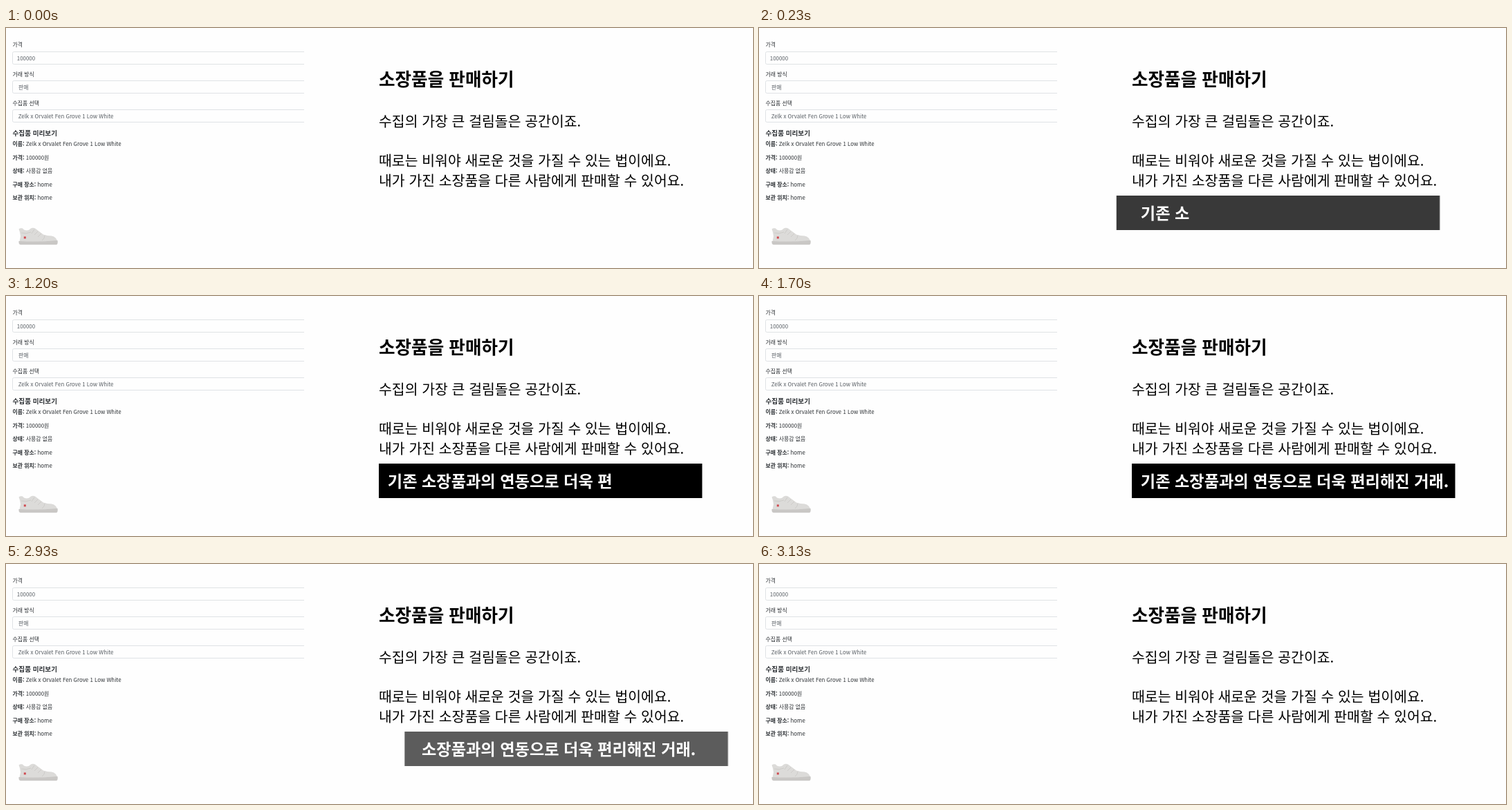
An HTML page for the animation above (5.01 s loop, 1080 by 348 pixels).

```html
<!DOCTYPE html>
<html lang="ko">
<head>
<meta charset="utf-8">
<title>소장품을 판매하기</title>
<style>
  html, body { margin: 0; width: 100%; height: 100%; overflow: hidden; background: #fefefe; }
  svg { display: block; font-family: "Noto Sans CJK KR", "Noto Sans", sans-serif; }

  .form { font-size: 7.9px; fill: #2b2f33; }
  .form .value { fill: #565c62; }
  .form .field { fill: #fefefe; stroke: #dfe2e5; stroke-width: 1; }
  .form .title { font-size: 9.6px; font-weight: 700; }
  .form .key { font-weight: 700; }

  .head { font-size: 25.6px; font-weight: 700; }
  .body { font-size: 20.48px; }
  .line { font-size: 23.2px; font-weight: 700; fill: #fefefe; }

  /* The bar moves on a 30 fps grid: 9 steps in, 9 steps out */
  .bar { animation: bar 5010ms -4ms infinite; }
  @keyframes bar {
    0%       { transform: translateX(-100px); opacity: 0; animation-timing-function: steps(9); }
    5.988%   { transform: none; opacity: 1; animation-timing-function: step-end; }
    56.5535% { transform: translateX(4px); opacity: .96; animation-timing-function: steps(9); }
    62.5416%, 100% { transform: translateX(104px); opacity: 0; }
  }

  /* Each letter is typed, held, then erased from the front at the same pace */
  .line tspan {
    fill-opacity: 0;
    animation: letter 5010ms calc(var(--i) * 71ms - 15ms) step-end infinite;
  }
  @keyframes letter {
    0% { fill-opacity: 1; }
    56.587%, 100% { fill-opacity: 0; }
  }
</style>
</head>
<body>
<svg width="1080" height="348" viewBox="0 0 1080 348">
  <defs>
    <clipPath id="pane"><rect width="431" height="348"/></clipPath>
  </defs>

  <g class="form" clip-path="url(#pane)">
    <text x="9.5" y="27.3">가격</text>
    <rect class="field" x="9.5" y="34.5" width="440" height="18" rx="2"/>
    <text class="value" x="15.8" y="47">100000</text>

    <text x="9.5" y="69.6">거래 방식</text>
    <rect class="field" x="9.5" y="76.5" width="440" height="18" rx="2"/>
    <text class="value" x="17.9" y="89.3">판매</text>

    <text x="9.5" y="111.5">수집품 선택</text>
    <rect class="field" x="9.5" y="118.5" width="440" height="18" rx="2"/>
    <text class="value" x="17.7" y="131.2">Zelk x Orvalet Fen Grove 1 Low White</text>

    <text class="title" x="9.5" y="155.8">수집품 미리보기</text>
    <text x="9.5" y="171.3"><tspan class="key">이름:</tspan> Zelk x Orvalet Fen Grove 1 Low White</text>
    <text x="9.5" y="190.8"><tspan class="key">가격:</tspan> 100000원</text>
    <text x="9.5" y="210.2"><tspan class="key">상태:</tspan> 사용감 없음</text>
    <text x="9.5" y="229.6"><tspan class="key">구매 장소:</tspan> home</text>
    <text x="9.5" y="249.1"><tspan class="key">보관 위치:</tspan> home</text>

    <path fill="#dcdbd9" d="M19.5 310 L21 302 Q20.5 296 18.5 291.5 Q21 289.5 24 290.5 Q26 293.5 30 293.5 Q34 293 36 290.5 Q39 289 42 290.5 L54 299.5 Q60 301.5 66 301.5 Q73 303 74 309.5 Z"/>
    <path fill="none" stroke="#c6c4c2" stroke-width=".7" d="M22 297 Q29 299 36 296 M41 292 L37 298 M46 295 L41 300 M51 298 L46 303 M56 301 Q56 305 52 308"/>
    <path fill="#c9c7c5" d="M18.5 309 Q46 310.5 74.5 308 Q75.5 313 73 314.3 H21 Q18 314 18.5 309 Z"/>
    <rect x="25.8" y="302.4" width="3" height="3" fill="#cf4a50"/>
  </g>

  <text class="head" x="539" y="83.8">소장품을 판매하기</text>
  <g class="body">
    <text x="539" y="142.8">수집의 가장 큰 걸림돌은 공간이죠.</text>
    <text x="539" y="200.4">때로는 비워야 새로운 것을 가질 수 있는 법이에요.</text>
    <text x="539" y="229.1">내가 가진 소장품을 다른 사람에게 판매할 수 있어요.</text>
  </g>

  <rect class="bar" x="539" y="243" width="467.5" height="50"/>
  <text class="line" x="551.8" y="277">기존 소장품과의 연동으로 더욱 편리해진 거래.</text>
</svg>
<script>
  const line = document.querySelector('.line');
  const letters = [...line.textContent];
  line.textContent = '';
  letters.forEach((letter, i) => {
    const span = document.createElementNS(line.namespaceURI, 'tspan');
    span.textContent = letter;
    span.style.setProperty('--i', i);
    line.append(span);
  });
</script>
</body>
</html>
```
